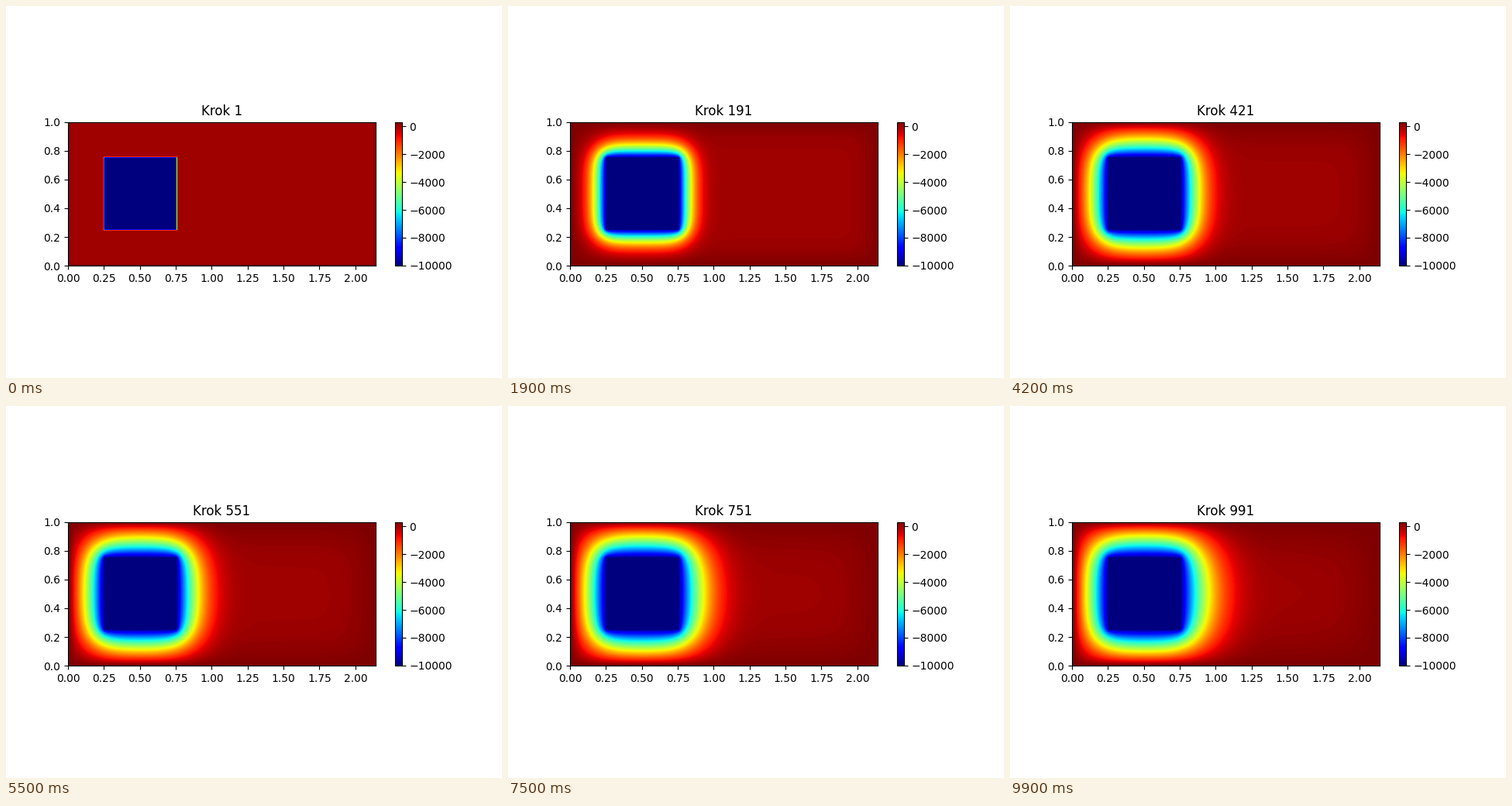
A matplotlib script for the animation above (10000 ms loop, 640 by 480 pixels).

```python
import numpy as np
import matplotlib.pyplot as plt
from matplotlib.animation import FuncAnimation

NX, NY = 215, 101
WIDTH, HEIGHT = 2.14, 1.0
EDGE, COLD = 300.0, -10000.0
FRAMES, STEPS = 100, 10
BLOCK = (slice(25, 76), slice(25, 76))


def start():
    u = np.zeros((NY, NX))
    u[[0, -1], :] = EDGE
    u[:, [0, -1]] = EDGE
    u[BLOCK] = COLD
    return u


def relax(u):
    """One Jacobi sweep with fixed walls and a fixed cold block."""
    new = u.copy()
    new[1:-1, 1:-1] = 0.25 * (u[:-2, 1:-1] + u[2:, 1:-1]
                              + u[1:-1, :-2] + u[1:-1, 2:])
    new[BLOCK] = COLD
    return new


def solve():
    u = start()
    fields = [u]
    for _ in range(FRAMES - 1):
        for _ in range(STEPS):
            u = relax(u)
        fields.append(u)
    return fields


fields = solve()

fig, ax = plt.subplots(figsize=(6.4, 4.8), dpi=100)
image = ax.imshow(fields[0], cmap="jet", vmin=COLD, vmax=EDGE,
                  origin="lower", extent=(0, WIDTH, 0, HEIGHT))
fig.colorbar(image, ax=ax, shrink=0.5)
title = ax.set_title("Krok 1")


def draw(i):
    image.set_data(fields[i])
    title.set_text(f"Krok {i * STEPS + 1}")
    return image, title


anim = FuncAnimation(fig, draw, frames=FRAMES, interval=100,
                     repeat=True, repeat_delay=0)
plt.show()
```
